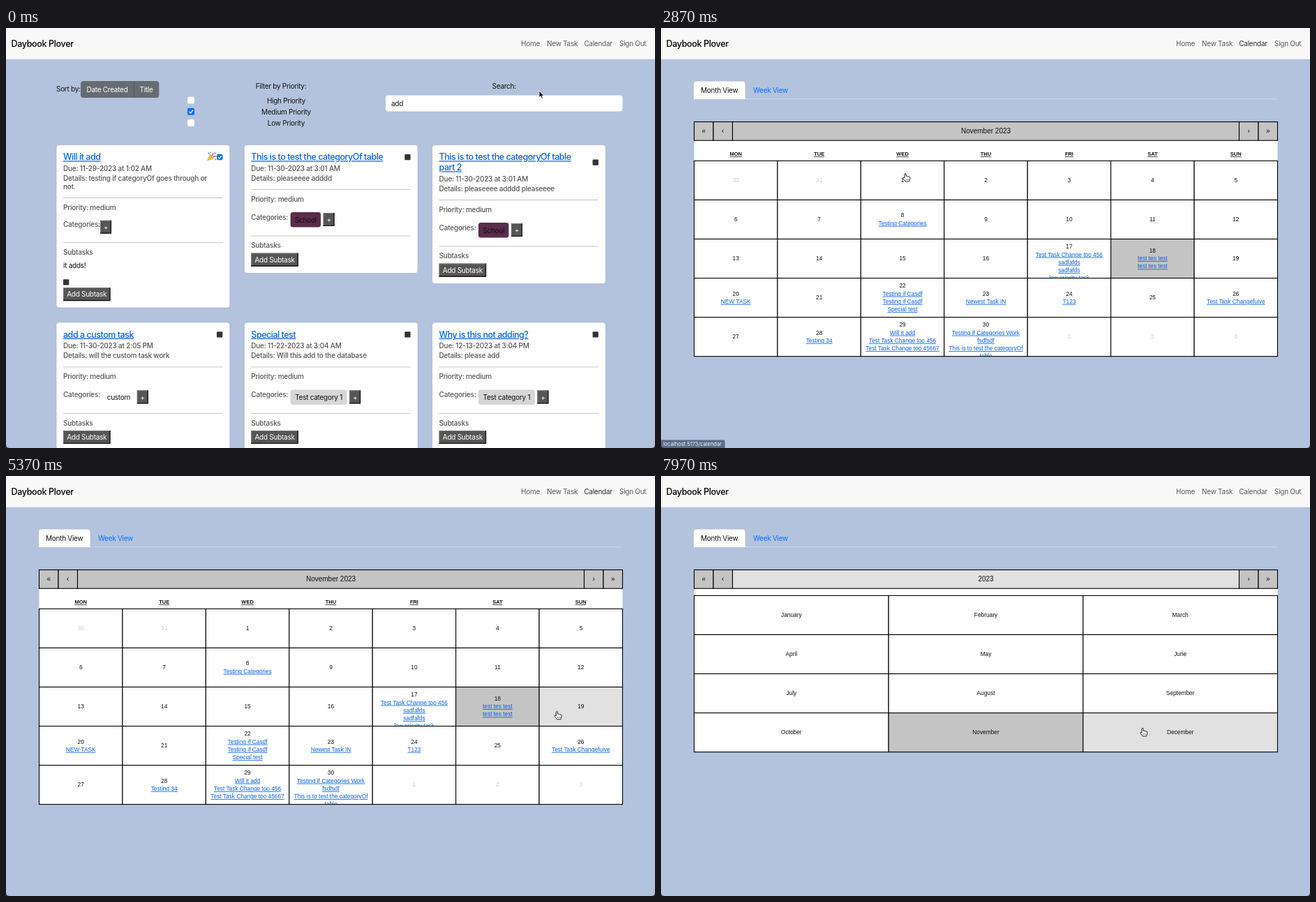
Recreate the animation shown at these times as an HTML page. Size 930 px wide and 602 px high, loop 8000 ms.

```html
<!DOCTYPE html>
<html lang="en">
<head>
<meta charset="utf-8">
<title>Task planner</title>
<style>
html, body { margin: 0; height: 100%; overflow: hidden; background: #b3c3dd; }
#stage { display: block; width: 100vw; height: 100vh; }
text { font: 10px Inter, sans-serif; letter-spacing: -.027em; fill: #111; }
.mid { text-anchor: middle; }
.brand { font-size: 12.5px; font-weight: 500; fill: #000; }
.nav { fill: #5b5c5d; }
.nav.active { fill: #303132; }
.white { fill: #fff; }
.title { font-size: 12.5px; font-weight: 500; letter-spacing: -.038em; }
.title, .link { fill: #0b62e4; text-decoration: underline; }
.tab { fill: #0d6efd; }
.soft { font-weight: 500; letter-spacing: -.021em; fill: #555; }
.cal, .tile, .week { font-family: "Liberation Sans", Arial, sans-serif; letter-spacing: 0; }
.tile { font-size: 8.33px; }
.week { font-size: 7.5px; font-weight: 700; text-decoration: underline dotted; }
.faint { fill: #c9c9c9; }
.status { font-size: 7.5px; fill: #f4f6fa; letter-spacing: 0; }
</style>
</head>
<body>
<svg id="stage" viewBox="0 0 930 602"></svg>
<script>
const stage = document.getElementById('stage');
const rect = (x, y, w, h, fill, more = '') =>
  `<rect x="${x}" y="${y}" width="${w}" height="${h}" fill="${fill}" ${more}/>`;
const text = (x, y, str, cls = '') => `<text x="${x}" y="${y}" class="${cls}">${str}</text>`;
const mid = (x, y, str, cls = '') => text(x, y, str, 'mid ' + cls);
const path = (d, stroke, width = 1, fill = 'none') =>
  `<path d="${d}" stroke="${stroke}" stroke-width="${width}" fill="${fill}"/>`;
const group = (id, content) => `<g id="${id}">${content}</g>`;

// ---- Task list ----
const checkbox = (x, y, size, checked) => checked
  ? rect(x, y, size, size, '#0d6efd', 'rx="2"') +
    path(`M${x + size * .25} ${y + size * .52}l${size * .2} ${size * .22} ${size * .33} -${size * .44}`, '#fff', 1.3)
  : rect(x, y, size, size, '#fff', 'rx="2.5" stroke="#d5dbe6" stroke-width=".5"');

const button = (x, y, w, label) =>
  rect(x, y, w, 19, '#565656') +
  path(`M${x + .5} ${y + 19}V${y + .5}H${x + w}`, '#777') +
  path(`M${x} ${y + 18.4}H${x + w - .6}V${y}`, '#151515', 1.3) +
  mid(x + w / 2, y + 13.2, label, 'white');

const popper = (x, y) =>
  path(`M${x} ${y + 12}L${x + 4} ${y + 3}L${x + 9} ${y + 9}Z`, '#b98a2c', .5, '#eebb4d') +
  path(`M${x + 6} ${y + 5}q3 -1 2 -4M${x + 8} ${y + 7}q2 -2 5 -1`, '#d5485a', 1.2) +
  path(`M${x + 1} ${y + 1}l2 1M${x + 10} ${y + 2}l2 -1M${x + 11} ${y + 10}l1 1M${x + 4} ${y}l1 1`, '#4b86c9', 1.4);

function card(x, y, task) {
  const left = x + 10, hr = lineY => path(`M${left} ${lineY}h228.5`, '#c6c6c6');
  const { title, details, badge, done, subtask } = task;
  const shift = 15 * (title.length - 1);
  let at = y + 37 + shift;
  let out = title.map((s, i) => text(left, y + 21.8 + 15 * i, s, 'title')).join('');
  out += text(left, at, 'Due: ' + task.due, 'soft');
  details.forEach((s, i) => out += text(left, at + 14.5 + 12 * i, s, 'soft'));
  at = y + 64 + shift + 12 * (details.length - 1);
  out += hr(at) + text(left, at + 17.4, 'Priority: medium', 'soft') +
    text(left, at + (badge ? 43 : 41.6), 'Categories:', 'soft');
  if (badge) {
    const [label, w, fill] = badge;
    out += rect(x + 66.3 - (fill === '#fff' ? 2 : 0), at + 32.6, w, 21.5, fill, 'rx="3.5"') +
      mid(x + 66.3 + w / 2, at + 47, label) + button(x + 69.8 + w, at + 33.5, 16, '+');
  } else out += button(x + 63, at + 32.3, 16, '+');
  at += badge ? 66.5 : 64;
  out += hr(at) + text(left, at + 17.2, 'Subtasks', 'soft');
  if (subtask) {
    out += text(left, at + 36, subtask) + rect(left, at + 52.7, 8.3, 8.3, '#333', 'rx="1"');
    at += 40;
  }
  out += button(left, at + 24.6, 67.5, 'Add Subtask');
  out += done ? checkbox(x + 230, y + 13.3, 8.5, true) + popper(x + 216.5, y + 10.5)
    : rect(x + 230, y + 13.4 + shift / 2, 8.3, 8.3, '#333', 'rx="1"');
  return rect(x, y, 248.8, at + 53.5 - y, '#fff', 'rx="4" stroke="#a8b4c8" stroke-width=".7"') + out;
}

const school = ['School', 43.5, '#5b2c4c'], test1 = ['Test category 1', 81, '#d6d6d6'];
const tasks = [
  { title: ['Will it add'], due: '11-29-2023 at 1:02 AM', done: true, subtask: 'it adds!',
    details: ['Details: testing if categoryOf goes through or', 'not.'] },
  { title: ['This is to test the categoryOf table'], due: '11-30-2023 at 3:01 AM',
    details: ['Details: pleaseeee adddd'], badge: school },
  { title: ['This is to test the categoryOf table', 'part 2'], due: '11-30-2023 at 3:01 AM',
    details: ['Details: pleaseeee adddd pleaseeee'], badge: school },
  { title: ['add a custom task'], due: '11-30-2023 at 2:05 PM',
    details: ['Details: will the custom task work'], badge: ['custom', 46, '#fff'] },
  { title: ['Special test'], due: '11-22-2023 at 3:04 AM',
    details: ['Details: Will this add to the database'], badge: test1 },
  { title: ['Why is this not adding?'], due: '12-13-2023 at 3:04 PM',
    details: ['Details: please add'], badge: test1 },
];

const taskPage =
  text(72, 90.5, 'Sort by:') + rect(107, 76, 112.3, 24, '#676c72', 'rx="4"') +
  path('M183.3 76v24', '#555a60') + mid(145, 91.7, 'Date Created', 'white') + mid(201, 91.7, 'Title', 'white') +
  mid(394, 87.3, 'Filter by Priority:') +
  ['High', 'Medium', 'Low'].map((p, i) =>
    checkbox(260, 98.5 + 16.2 * i, 10, i === 1) + mid(401.5, 107.5 + 16.1 * i, p + ' Priority')).join('') +
  mid(713.7, 87.3, 'Search:') + rect(544, 96.5, 339.5, 23, '#fff', 'rx="4"') + text(552, 111.5, 'add') +
  tasks.map((t, i) => card(72 + 269.3 * (i % 3), 167.5 + 254.4 * (i / 3 | 0), t)).join('');

// ---- Calendar ----
const LEFT = 47.5, WIDTH = 836, ROW = 56.05, GREY = '#c4c4c4', LIGHT = '#e1e1e1';
const areas = [];
function area(view, x, y, w, h, base, hover = LIGHT) {
  areas.push({ view, x, y, w, h, base, hover });
  return rect(x, y, w, h, base, `class="area" stroke="#000" stroke-width="1.1"`);
}

function calendarTop(view, label, labelFill) {
  const buttons = [[0, 27.5, '«'], [27.5, 27.5, '‹'], [55, 726, label], [781, 27.5, '›'], [808.5, 27.5, '»']];
  return buttons.map(([x, w, s]) =>
    area(view, LEFT + x, 134.5, w, 26.7, s === label ? labelFill : GREY) +
    mid(LEFT + x + w / 2, 150.8, s, 'cal')).join('');
}

const events = {
  8: ['Testing Categories'],
  17: ['Test Task Change too 456', 'sadfafds', 'sadfafds', 'low priority task'],
  18: ['test tes test', 'test tes test'],
  20: ['NEW TASK'],
  22: ['Testing if Casdf', 'Testing if Casdf', 'Special test'],
  23: ['Newest Task IN'],
  24: ['T123'],
  26: ['Test Task Changefuive'],
  28: ['Testing 34'],
  29: ['Will it add', 'Test Task Change too 456', 'Test Task Change too 45667'],
  30: ['Testing if Categories Work', 'fsdfsdf', 'This is to test the categoryOf', 'table'],
};

function day(i) {
  const w = WIDTH / 7, x = LEFT + w * (i % 7), y = 190.4 + ROW * (i / 7 | 0);
  const date = i - 1, inMonth = date > 0 && date <= 30;
  const label = date < 1 ? date + 31 : inMonth ? date : date - 30;
  const lines = inMonth && events[date] || [];
  const first = ROW / 2 - 5.6 * Math.min(lines.length, 3) + 2.6;
  const today = date === 18;
  return area('month', x, y, w, ROW, today ? GREY : '#fff', today ? '#ffff9b' : LIGHT) +
    `<svg x="${x}" y="${y}" width="${w}" height="${ROW - .6}">` +
    mid(w / 2, first, label, inMonth ? 'tile' : 'tile faint') +
    lines.map((s, n) => mid(w / 2, first + 11.25 * (n + 1), s, 'tile link')).join('') + '</svg>';
}

const range = n => [...Array(n).keys()];
const months = 'January February March April May June July August September October November December'.split(' ');

const monthPage = rect(LEFT, 134, WIDTH, 336, '#fff') + calendarTop('month', 'November 2023', GREY) +
  'MON TUE WED THU FRI SAT SUN'.split(' ').map((d, i) =>
    mid(LEFT + WIDTH / 7 * (i + .5), 183.3, d, 'week')).join('') +
  range(35).map(day).join('');

const yearPage = rect(LEFT, 134, WIDTH, 261, '#fff') + calendarTop('year', '2023', LIGHT) +
  months.map((m, i) => {
    const w = WIDTH / 3, x = LEFT + w * (i % 3), y = 171.4 + ROW * (i / 3 | 0);
    return area('year', x, y, w, ROW, i === 10 ? GREY : '#fff') + mid(x + w / 2, y + 30.6, m, 'tile');
  }).join('');

const tabs = path('M47 101.7H883.5', '#cbd5e6') +
  path('M47 102V80.5q0 -4 4 -4H116.5q4 0 4 4V102Z', 'none', 0, '#fff') +
  mid(83.7, 93, 'Month View') + text(132, 93, 'Week View', 'tab');

// ---- Frame, status bar and pointers ----
const header = rect(0, 0, 930, 44.6, '#f8f8f8') + text(7.5, 27, 'Daybook Plover', 'brand') +
  [[738, 'Home'], [775, 'New Task'], [828.3, 'Calendar'], [879, 'Sign Out']]
    .map(([x, s]) => text(x, 26.3, s, 'nav')).join('');

const status = path('M0 590.5H89.5q2 0 2 2V602H0Z', 'none', 0, '#596a86') +
  text(3, 599.2, 'localhost:5173/calendar', 'status');

const corners = path('M0 598.5V602H3.5Q0 602 0 598.5ZM930 598.5V602H926.5Q930 602 930 598.5Z', '#333', .6, '#222');

const arrow = path('M0 0V9.6L2.2 7.6 3.8 11.2 5.4 10.5 3.9 7H6.8Z', '#fff', .8, '#000');
const hand = path('M-1 1.2Q0 -.4 1.1 1V4.4Q2.2 3.6 3.1 4.7Q4.2 4 5 5.2Q6.5 4.8 6.8 6.3V8.4L5.6 12H.2' +
  'Q-.8 9.8 -3.2 7.6Q-3.4 5.9 -1.6 6.4L-1 7Z', '#111', .9, '#fff') +
  path('M1.2 8.2v2M3 8.2v2M4.7 8.2v2', '#333', .6);

stage.innerHTML = rect(0, 0, 930, 602, '#b3c3dd') + group('tasks', taskPage) +
  group('calendar', tabs + group('month', monthPage) + group('year', yearPage)) +
  header + group('status', status) + corners + group('arrow', arrow) + group('hand', hand);

const byId = id => document.getElementById(id);
const show = (id, on) => byId(id).setAttribute('display', on ? 'inline' : 'none');
const calendarLink = document.querySelectorAll('.nav')[2];
document.querySelectorAll('.area').forEach((el, i) => areas[i].el = el);

// ---- Timeline ----
const LOOP = 8000, HOVER_LINK = 1230, OPEN_CALENDAR = 1680, OPEN_YEAR = 6860;
const pointerKeys = [
  [0, 764, 90], [120, 764, 90], [620, 822, 7], [1050, 849, 23], [2430, 850, 24], [2530, 855, 36],
  [2860, 350, 208], [2960, 350, 208], [3760, 724, 301], [3860, 724, 301], [4660, 506, 385],
  [4760, 506, 385], [5450, 800, 335], [6500, 698, 150.5], [6900, 698, 150.5], [7850, 690, 361], [LOOP, 690, 361],
];

function pointerAt(t) {
  const i = pointerKeys.findIndex(k => k[0] > t);
  const [t0, x0, y0] = pointerKeys[i - 1], [t1, x1, y1] = pointerKeys[i];
  const u = (t - t0) / (t1 - t0), e = u * u * (3 - 2 * u);
  return [x0 + (x1 - x0) * e, y0 + (y1 - y0) * e];
}

function draw(now) {
  const t = now % LOOP, [x, y] = pointerAt(t);
  const view = t < OPEN_CALENDAR ? 'tasks' : t < OPEN_YEAR ? 'month' : 'year';
  show('tasks', view === 'tasks');
  show('calendar', view !== 'tasks');
  show('month', view === 'month');
  show('year', view === 'year');
  show('status', t >= HOVER_LINK + 60 && t < 2990);
  calendarLink.classList.toggle('active', t >= HOVER_LINK && t < OPEN_YEAR);

  // The page reacts to the pointer only once it has settled on the calendar.
  for (const a of areas) {
    const px = x - a.x, py = y + 3 - a.y;
    const over = t > 2900 && a.view === view && px >= 0 && px < a.w && py >= 0 && py < a.h;
    a.el.setAttribute('fill', over ? a.hover : a.base);
  }

  const pointing = t >= HOVER_LINK;
  show('arrow', !pointing);
  show('hand', pointing);
  byId(pointing ? 'hand' : 'arrow').setAttribute('transform', `translate(${x} ${y})`);
  requestAnimationFrame(tick);
}

const start = performance.now();
function tick() { draw(performance.now() - start); }
tick();
</script>
</body>
</html>
```
